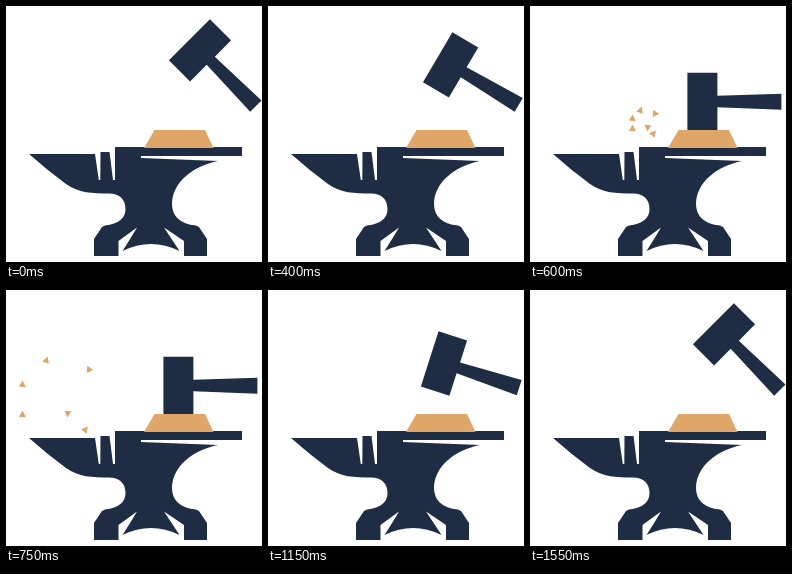
Animation of 256 by 256 pixels, one loop 1.6 s. Source, as an HTML page:

```html
<!DOCTYPE html>
<html lang="en">
<head>
<meta charset="utf-8">
<title>Hammer and anvil</title>
<style>
  html, body { margin: 0; width: 100%; height: 100%; overflow: hidden; background: #fff; }
  svg { display: block; width: 100vw; height: 100vh; }
  .iron { fill: #1e2d44; }
  .hot { fill: #dfa667; }
</style>
</head>
<body>
<svg viewBox="0 0 256 256">
  <g class="iron">
    <path d="M23 148H89L92.800 174H94.300L94.500 146H103.500L107 174H109V141H236V150H135V152L212 155
      C187 160 166.500 176 166 198C166 210 174 218 190 219.500L193 221L201 233V250H178V235L158 221.500
      Q167 235 173.500 245Q145 231 116.500 245Q123 235 131 221.500L112.500 235V250H88V233L96 221L99 219.500
      C113 218 119.500 212 119.500 203C119.500 193 113 187.500 103 187.500C86 187.500 73 187 60 178Q41 164 23 148Z"/>
    <g id="hammer">
      <path d="M157 66H187V89L251 87V103L187 100.500V124H157Z"/>
    </g>
  </g>
  <path class="hot" d="M148.500 124H199L207.500 142H138Z"/>
  <g id="sparks" class="hot"></g>
</svg>
<script>
  const LOOP = 1600;
  const RAISED = 45;
  const PIVOT = "245 95.3";
  const OFFSET = "0.4 0.8";
  const fall = { start: 75, end: 550 };
  const lift = { start: 950, end: 1550 };
  const burst = { origin: [146, 121], start: 525, show: 550, end: 800 };

  // Spark travel per 75 ms (x, y) and fixed tilt
  const sparkPaths = [
    [-35, -17, 20], [-21, -14, -25], [-43, -9, 5],
    [-43, 1, 0], [-28, 1, 185], [-22, 6, 40]
  ];

  const hammer = document.getElementById("hammer");
  const sparkGroup = document.getElementById("sparks");
  const sparks = sparkPaths.map(() => {
    const el = document.createElementNS("http://www.w3.org/2000/svg", "path");
    el.setAttribute("d", "M0 -3.500L3.500 3H-3.500Z");
    return sparkGroup.appendChild(el);
  });

  const progress = (t, { start, end }) =>
    Math.min(1, Math.max(0, (t - start) / (end - start)));
  const easeFall = s => s ** 3;
  const easeLift = s => 0.9 * s * (1 - s) ** 2 + s * s * (3 - 2 * s);

  function render(t) {
    const angle = RAISED *
      (1 - easeFall(progress(t, fall)) + easeLift(progress(t, lift)));
    hammer.setAttribute("transform", `translate(${OFFSET}) rotate(${angle} ${PIVOT})`);

    const visible = t >= burst.show && t < burst.end;
    sparkGroup.setAttribute("visibility", visible ? "visible" : "hidden");
    const reach = (t - burst.start) / 75;
    sparkPaths.forEach(([dx, dy, tilt], i) => {
      const x = burst.origin[0] + dx * reach;
      const y = burst.origin[1] + dy * reach;
      sparks[i].setAttribute("transform", `translate(${x} ${y}) rotate(${tilt})`);
    });
  }

  const began = performance.now();
  function tick() {
    render((performance.now() - began) % LOOP);
    requestAnimationFrame(tick);
  }
  render(0);
  requestAnimationFrame(tick);
</script>
</body>
</html>
```
